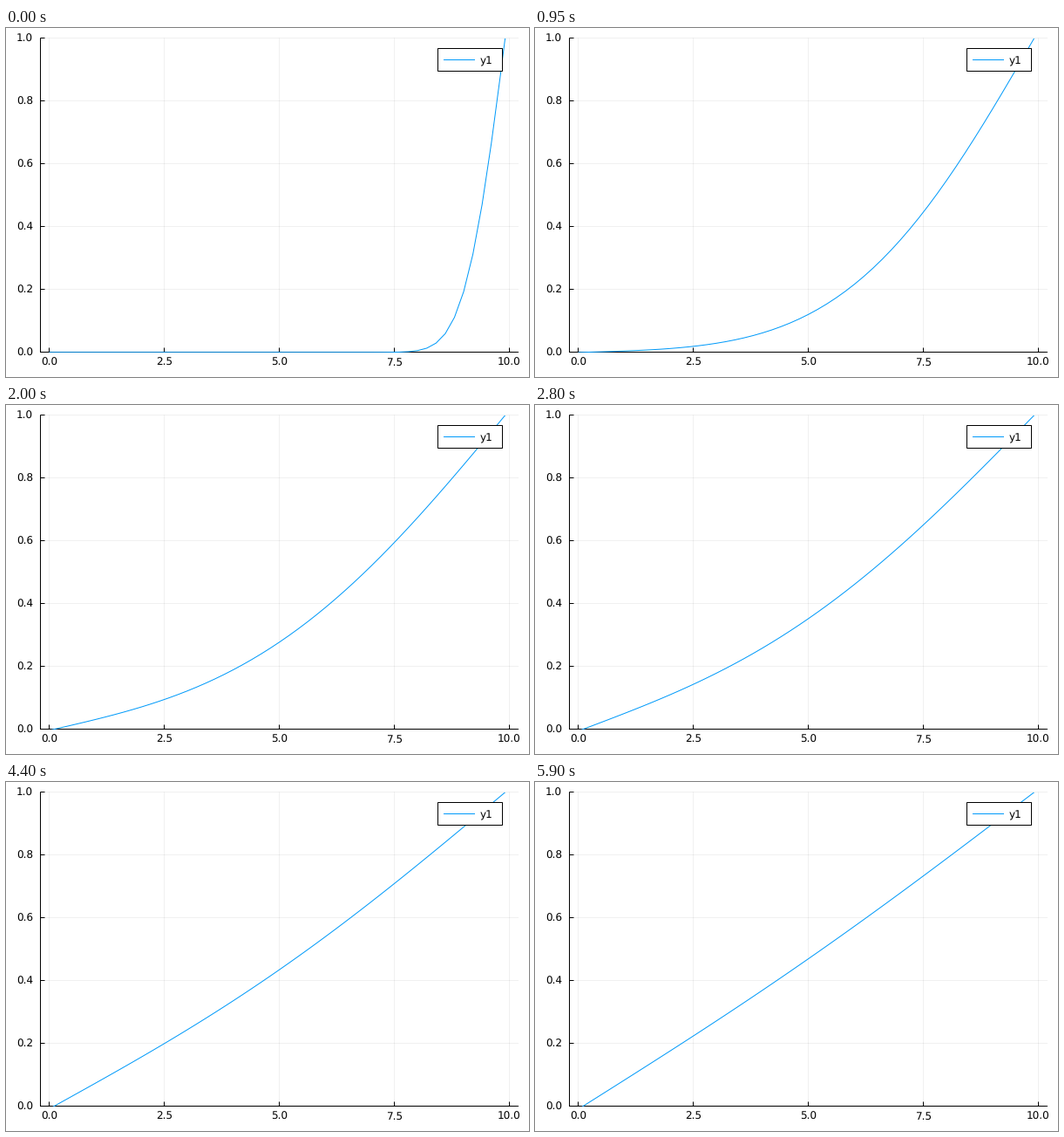
These frames come from a looping animation (600 by 400 pixels, 5950 ms). A matplotlib script:

```python
import numpy as np
import matplotlib.pyplot as plt
from matplotlib.animation import FuncAnimation
from matplotlib.patches import Rectangle

plt.rcParams["text.hinting"] = "none"

W, H, DPI = 600, 400, 100
FRAMES, INTERVAL = 119, 50
STEPS = 25          # diffusion steps per frame
R = 0.25            # D * dt / dx^2
BLUE = "#009AFA"
PX = 72 / DPI       # one pixel in points

x = np.linspace(0, 10, 51)


def solve():
    """Explicit heat equation; ghost cells hold the walls at 0 and 1."""
    u = np.zeros_like(x)
    states = []
    for _ in range(FRAMES):
        for _ in range(STEPS):
            u[1:-1] += R * (u[2:] - 2 * u[1:-1] + u[:-2])
            u[0] = -u[1]
            u[-1] = 2 - u[-2]
        states.append(u.copy())
    return states


def to_x(v):
    return 49.6 + 52.83 * v


def to_y(v):
    return 371.7 - 359.9 * v


def pixel(v):
    return np.floor(v) + 0.5


states = solve()

fig = plt.figure(figsize=(W / DPI, H / DPI), dpi=DPI, facecolor="white")
ax = fig.add_axes([0, 0, 1, 1])
ax.set_xlim(0, W)
ax.set_ylim(H, 0)
ax.axis("off")

LEFT, RIGHT, TOP, BOTTOM = 39.5, 588, 11.5, 371.5


def line(xs, ys, color="black", z=2, **kw):
    return ax.plot(xs, ys, color=color, lw=PX, zorder=z, snap=False,
                   solid_capstyle="butt", **kw)[0]


def label(px, py, s, ha):
    ax.text(px, py, s, ha=ha, va="baseline", family="DejaVu Sans",
            fontsize=12 * PX, color="black", zorder=7)


for v in np.arange(0, 10.1, 2.5):
    p = pixel(to_x(v))
    line([p, p], [TOP, BOTTOM], z=1, alpha=0.06)
    line([p, p], [BOTTOM, BOTTOM - 5])
    label(p, 387, f"{v:.1f}", "center")

for v in np.linspace(0, 1, 6):
    p = pixel(to_y(v))
    line([LEFT, RIGHT], [p, p], z=1, alpha=0.06)
    line([LEFT, LEFT + 5], [p, p])
    label(31, p + 4.4, f"{v:.1f}", "right")

line([LEFT, LEFT], [TOP, BOTTOM + 0.5])
line([LEFT - 0.5, RIGHT], [BOTTOM, BOTTOM])

curve = line(to_x(x), to_y(states[0]), BLUE, 3)
curve.set_clip_path(Rectangle((LEFT, TOP), RIGHT - LEFT, BOTTOM + 0.5 - TOP,
                              transform=ax.transData))

# legend
ax.add_patch(Rectangle((495.5, 23.5), 74, 26, fc="white", ec="black",
                       lw=PX, snap=False, zorder=5))
line([502, 538], [36.5, 36.5], BLUE, 6)
label(544, 41, "y1", "left")


def update(i):
    curve.set_ydata(to_y(states[i]))
    return (curve,)


anim = FuncAnimation(fig, update, frames=FRAMES, interval=INTERVAL,
                     repeat=True, repeat_delay=0, blit=False)
plt.show()
```
